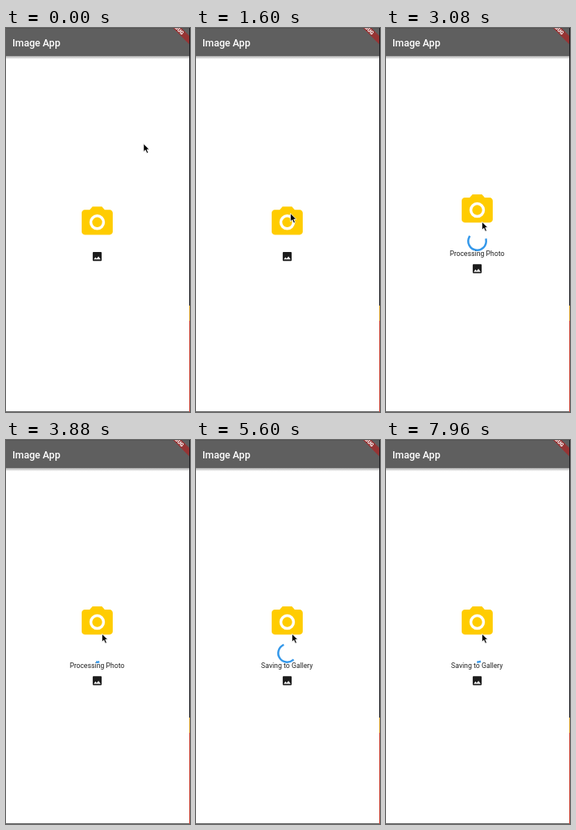
An HTML page for the animation above (8000 ms loop, 231 by 480 pixels).

```html
<!DOCTYPE html>
<html lang="en">
<head>
<meta charset="utf-8">
<title>Image App</title>
<style>
  html, body { margin: 0; width: 100%; height: 100%; overflow: hidden; background: #fff; }
  svg { display: block; width: 231px; height: 480px; }
  text { font-family: Roboto, "Noto Sans", sans-serif; }
</style>
</head>
<body>
<svg viewBox="0 0 231 480">
  <defs>
    <linearGradient id="shade" x2="0" y2="1">
      <stop stop-color="#000" stop-opacity=".34"/>
      <stop offset="1" stop-color="#000" stop-opacity="0"/>
    </linearGradient>
    <clipPath id="screen"><rect width="230" height="480"/></clipPath>
  </defs>
  <rect width="231" height="480" fill="#fff"/>

  <rect y="35" width="230" height="4" fill="url(#shade)"/>
  <rect width="230" height="35" fill="#5f5f5f"/>
  <rect width="230" height="1" fill="#555"/>
  <text x="8" y="23" font-size="12.5" font-weight="500" fill="#fff">Image App</text>
  <g clip-path="url(#screen)">
    <g transform="translate(230 -15) rotate(45)">
      <rect x="-25" y="17.5" width="50" height="7.5" fill="#963434"/>
      <text y="23.5" font-size="6.4" font-weight="900" fill="#fff" text-anchor="middle">DEBUG</text>
    </g>
  </g>

  <circle id="ripple" cx="114.5" cy="242.8" fill="#c4c4c4"/>
  <g id="camera">
    <path transform="translate(91.1 219.4) scale(1.95)" fill="#fc0" fill-rule="evenodd" d="M9 2 7.17 4H4c-1.1 0-2 .9-2 2v12c0 1.1.9 2 2 2h16c1.1 0 2-.9 2-2V6c0-1.1-.9-2-2-2h-3.17L15 2zM12 17a5 5 0 1 1 0-10 5 5 0 0 1 0 10zM12 15.2a3.2 3.2 0 1 0 0-6.4 3.2 3.2 0 0 0 0 6.4z"/>
  </g>
  <g id="picture">
    <path transform="translate(107 278) scale(.625)" fill="#1c1c1c" d="M21 19V5c0-1.1-.9-2-2-2H5c-1.1 0-2 .9-2 2v14c0 1.1.9 2 2 2h14c1.1 0 2-.9 2-2zM8.5 13.5l2.5 3.01L14.5 12l4.5 6H5z"/>
  </g>
  <g id="busy">
    <path id="arc" fill="none" stroke="#3498ea" stroke-width="2.5" stroke-linecap="square"/>
    <text id="label" x="114.3" y="285.2" font-size="8.75" fill="#222" text-anchor="middle"></text>
  </g>

  <path d="M230.5 0V347" stroke="#1b1b1f"/>
  <path d="M230.5 347V366" stroke="#dca32c"/>
  <path d="M230.5 366V480" stroke="#cf4a3c"/>
  <path d="M0 479.5H230" stroke="#666"/>

  <path id="cursor" d="M0 0V10.2L2.4 8 4.1 12 6 11.2 4.3 7.3H7.4z" fill="#000" stroke="#fff" stroke-width=".8"/>
</svg>
<script>
  const LOOP = 8000, BUSY_AT = 2743, SAVE_AT = 4960;
  const $ = id => document.getElementById(id);
  const clamp = x => Math.min(1, Math.max(0, x));
  const span = (t, a, b) => clamp((t - a) / (b - a));
  const smooth = x => x * x * (3 - 2 * x);
  const move = (el, x, y) => el.setAttribute('transform', `translate(${x} ${y})`);

  // cubic-bezier(.4, 0, .2, 1)
  function fastOutSlowIn(x) {
    let lo = 0, hi = 1;
    for (let i = 0; i < 20; i++) {
      const u = (lo + hi) / 2, v = 1 - u;
      if (1.2 * u * v * v + .6 * u * u * v + u ** 3 < x) lo = u; else hi = u;
    }
    return lo * lo * (3 - 2 * lo);
  }

  // Indeterminate ring: 1333 ms stroke cycle on a 2222 ms rotation
  function arcPath(ms) {
    const phase = ms / 1333 % 1;
    const head = fastOutSlowIn(span(phase, 0, .5));
    const tail = fastOutSlowIn(span(phase, .5, 1));
    const start = Math.PI * (-.5 + 1.5 * tail + 2 * ms / 2222 + .5 * phase);
    const sweep = Math.max(1.5 * Math.PI * (head - tail), .01);
    const point = a => `${114.5 + 11.25 * Math.cos(a)} ${266.4 + 11.25 * Math.sin(a)}`;
    return `M${point(start)}A11.25 11.25 0 ${+(sweep > Math.PI)} 1 ${point(start + sweep)}`;
  }

  function draw(t) {
    const busy = t >= BUSY_AT;
    const go = smooth(span(t, 480, 1560)), settle = smooth(span(t, 1620, 1800));
    move($('cursor'), 172.7 - 54.2 * go + 2 * settle, 144.6 + 87.2 * go + 10.4 * settle);

    $('ripple').setAttribute('r', 10 + 27.5 * smooth(span(t, 1800, 2000)));
    $('ripple').setAttribute('opacity', .45 * span(t, 1800, 1900) * (1 - span(t, 1960, 2180)));

    move($('camera'), 0, busy ? -15.2 : 0);
    move($('picture'), 0, busy ? 15.4 : 0);
    $('busy').style.display = busy ? '' : 'none';
    if (busy) {
      $('arc').setAttribute('d', arcPath((t - BUSY_AT) * 1.038));
      $('label').textContent = t < SAVE_AT ? 'Processing Photo' : 'Saving to Gallery';
    }
  }

  const began = performance.now();
  function tick() {
    draw((performance.now() - began) % LOOP);
    requestAnimationFrame(tick);
  }
  tick();
</script>
</body>
</html>
```
